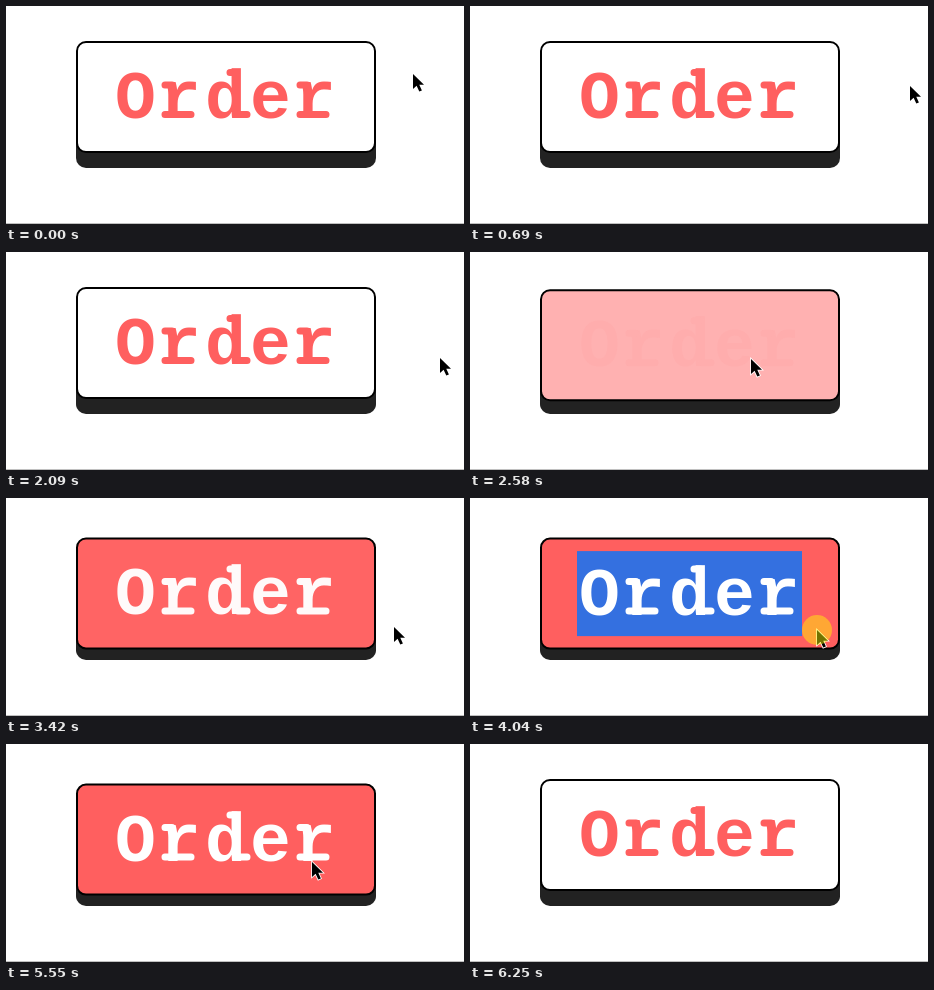
Recreate the animation shown at these times as an HTML page. Size 458x218 px, loop 6520 ms.

```html
<!DOCTYPE html>
<html lang="en">
<head>
<meta charset="utf-8">
<title>Order button</title>
<style>
  html, body { margin: 0; width: 100%; height: 100%; overflow: hidden; background: #fff; }
  svg { display: block; width: 458px; height: 218px; }
  text {
    font: bold 68px "Courier New", "Liberation Mono", monospace;
    letter-spacing: 4.2px;
  }
  #label { fill: currentColor; stroke: none; }
  #slabs { fill: none; stroke: currentColor; stroke-width: 7; stroke-linecap: round; }
</style>
</head>
<body>
<svg viewBox="0 0 458 218">
  <path d="M0 217.5H458" stroke="#c0c0c0"/>
  <rect x="70" y="50" width="300" height="112" rx="10" fill="#222"/>
  <g id="face">
    <rect id="plate" x="71" y="36" width="298" height="110" rx="9" stroke="#000" stroke-width="2"/>
    <rect id="selection" x="107" y="48.5" width="225" height="85" fill="#3470e0"/>
    <g id="lettering">
      <text id="label" x="109" y="112">Order</text>
      <path id="slabs" d="M159 108.5H185M159 79H166M224 66.5H230M232 108.5H241M294 108.5H320M294 79H301"/>
    </g>
  </g>
  <g id="pointer">
    <path d="M0 0V15L3.6 11.8L6.3 17.6L8.9 16.4L6.3 10.8H11Z" stroke="#fff" stroke-width="1.6" paint-order="stroke"/>
    <circle id="click" r="15" fill="#ff0" opacity=".45"/>
  </g>
</svg>
<script>
const LOOP = 6520, STEP = 70;
const bursts = [0, 690, 4040, 4730, 5550];

// Each key is [time in ms, value, ...].
const path = [
  [0, 407, 68], [140, 380, 85], [350, 300, 105], [550, 400, 95], [690, 440, 80],
  [830, 428, 85], [1000, 330, 105], [1250, 215, 128], [1390, 213, 130], [1460, 213, 130],
  [1700, 360, 115], [1900, 446, 100], [2160, 430, 108], [2370, 380, 115], [2580, 281, 107],
  [2720, 360, 120], [2900, 446, 125], [3100, 360, 135], [3200, 300, 130], [3420, 388, 129],
  [3490, 412, 130], [3630, 400, 135], [3760, 365, 133], [3900, 347, 132], [4110, 347, 132],
  [4320, 400, 145], [4530, 424, 152], [4730, 424, 152], [4870, 336, 107], [5290, 290, 110],
  [5480, 290, 110], [5700, 340, 135], [5850, 378, 160], [6110, 405, 197]
];
const hover = [
  [170, 0], [350, 1], [490, 1], [690, 0], [930, 0], [1130, 1], [1720, 1], [1950, 0],
  [2430, 0], [2580, .49], [2700, 1], [2730, 1], [2930, 0], [3080, 0], [3260, 1],
  [3370, 1], [3420, .97], [3620, 0], [3740, 0], [3920, 1], [4190, 1], [4440, 0],
  [4730, 0], [4870, .82], [4980, 1], [5770, 1], [6020, 0]
];
const press = [[1180, 0], [1300, 1], [1400, 1], [1530, 0], [4040, 0], [4110, 1], [4180, 0]];
const clicks = [[1250, 1460], [3830, 3900], [3970, 4130]];

const $ = id => document.getElementById(id);
const mix = (a, b, p) => a + (b - a) * p;
const blend = (from, to, p) => `rgb(${from.map((c, i) => Math.round(mix(c, to[i], p)))})`;
const within = (t, [start, end]) => t >= start && t < end;
const show = (id, on) => $(id).setAttribute("visibility", on ? "visible" : "hidden");
const move = (id, x, y) => $(id).setAttribute("transform", `translate(${x} ${y})`);

function sample(keys, t) {
  const next = keys.findIndex(key => key[0] > t);
  if (next === 0) return keys[0].slice(1);
  if (next < 0) return keys[keys.length - 1].slice(1);
  const a = keys[next - 1], b = keys[next];
  const p = (t - a[0]) / (b[0] - a[0]);
  return a.slice(1).map((v, i) => mix(v, b[i + 1], p));
}

function quantize(t) {
  const base = bursts.filter(start => start <= t).pop();
  return base + Math.floor((t - base) / STEP) * STEP;
}

const WHITE = [255, 255, 255], CORAL = [255, 95, 95], DEEP = [248, 85, 85];

function draw(now) {
  const t = quantize(now % LOOP);
  const [h] = sample(hover, t), [p] = sample(press, t), [x, y] = sample(path, t);
  const selected = within(t, [3970, 4390]);
  const clicking = clicks.some(span => within(t, span));
  const hot = CORAL.map((c, i) => mix(c, DEEP[i], p));

  move("face", 0, 4.6 * h + 2.4 * p);
  $("plate").setAttribute("fill", blend(WHITE, hot, h));
  $("lettering").style.color = selected ? "#fff" : blend(CORAL, WHITE, h);
  show("selection", selected);
  move("pointer", Math.round(x), Math.round(y));
  show("pointer", t < 6250);
  show("click", clicking);
}

function frame() {
  draw(performance.now());
  requestAnimationFrame(frame);
}
frame();
</script>
</body>
</html>
```
